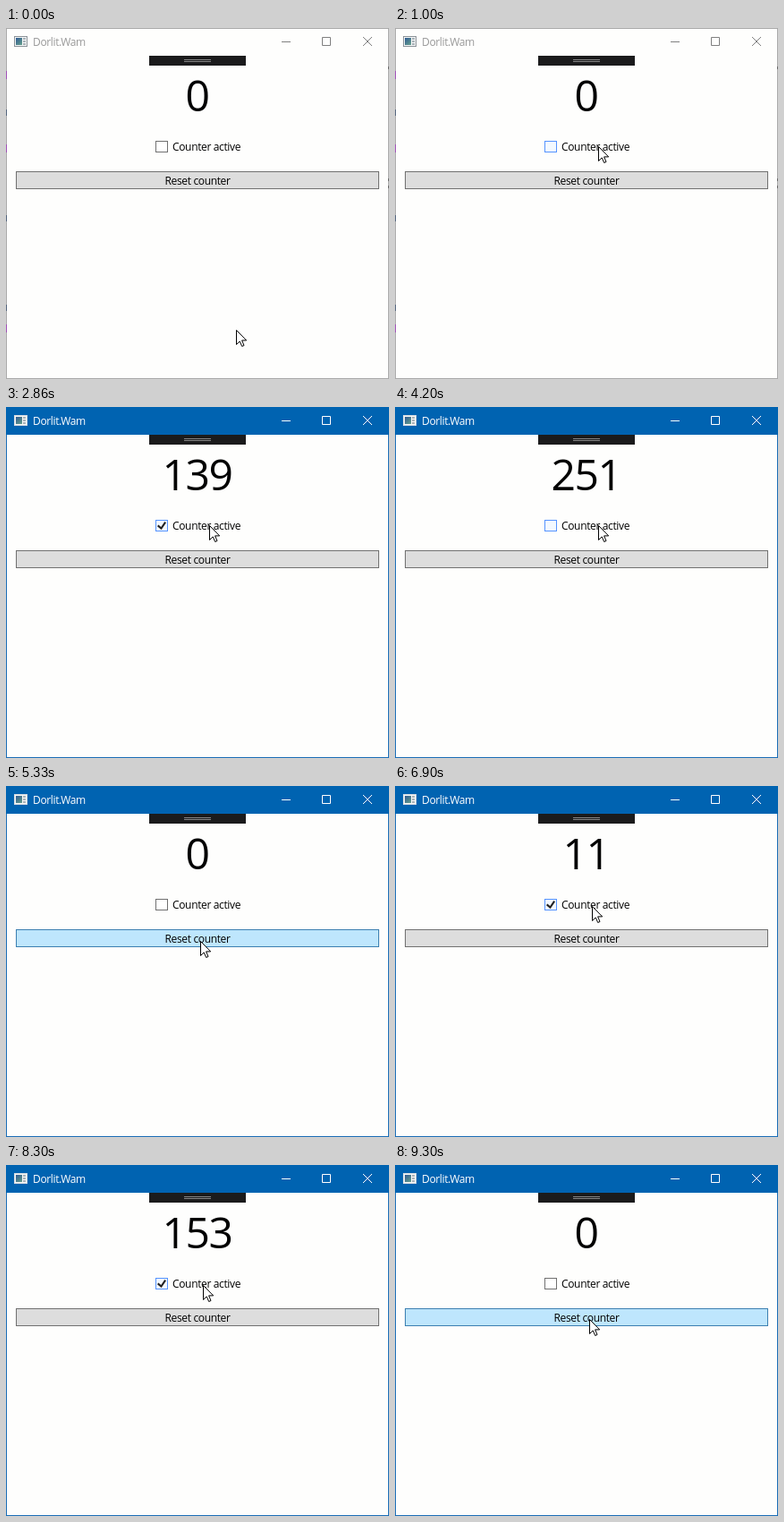
An HTML page with a canvas for the animation above (9.66 s loop, 428 px wide and 392 px high).

```html
<!DOCTYPE html>
<html lang="en">
<head>
<meta charset="utf-8">
<title>Counter window</title>
<style>
  html, body { margin: 0; width: 428px; height: 392px; overflow: hidden; }
  canvas { display: block; }
</style>
</head>
<body>
<canvas id="stage" width="428" height="392"></canvas>
<script>
const ctx = document.getElementById('stage').getContext('2d');
const LOOP = 9660;
const RATE = 0.1014; // counts per ms

// Pointer moves: start time, end time, end x, end y
const START = [257, 337];
const MOVES = [
  [230, 1000, 227, 132],
  [4170, 4900, 217, 173],
  [6130, 6640, 220, 134],
  [8470, 8880, 217, 172],
];
const ARROW = new Path2D('M.5 .5V16.5L4.2 12.9L6.7 18.5L9 17.5L6.6 11.9H11.7Z');
const TICK = new Path2D('M10 1.2L4.7 9.1H4.5L0 5.2L1.3 3.5L4.25 6.1L8.3 0Z');

const within = (t, a, b) => t >= a && t < b;
const ease = k => k * k * (3 - 2 * k);

function pointer(t) {
  let [x, y] = START;
  for (const [from, to, ex, ey] of MOVES) {
    const k = ease(Math.min(1, Math.max(0, (t - from) / (to - from))));
    x += (ex - x) * k;
    y += (ey - y) * k;
  }
  return [Math.round(x), Math.round(y)];
}

function count(t) {
  const run = (start, max) => Math.min(max, Math.floor((t - start) * RATE));
  if (within(t, 1500, 1660)) return 1;
  if (within(t, 1660, 5330)) return run(1487, 251);
  if (within(t, 6800, 9260)) return run(6788, 166);
  return 0;
}

function rect(x, y, w, h, fill) {
  ctx.fillStyle = fill;
  ctx.fillRect(x, y, w, h);
}

function box(x, y, w, h, fill, border) {
  rect(x, y, w, h, border);
  rect(x + 1, y + 1, w - 2, h - 2, fill);
}

function text(str, x, y, size, color, align, spacing) {
  ctx.font = `${size}px "Open Sans", "Noto Sans", sans-serif`;
  ctx.letterSpacing = spacing + 'px';
  ctx.textAlign = align;
  ctx.fillStyle = color;
  ctx.fillText(str, x, y);
}

function drawWindow(active) {
  box(0, 0, 428, 392, '#fefefd', active ? '#1a6db5' : '#a9a9a9');
  if (active) {
    rect(0, 0, 428, 31, '#0063b1');
  } else {
    // Background showing through the translucent border
    for (const y of [48, 130, 331]) rect(0, y, 1, 9, '#a050b8');
    for (const y of [91, 209, 309]) rect(0, y, 1, 7, '#52647c');
    for (const y of [43, 168, 176]) rect(427, y, 1, 3, '#666');
  }

  box(9, 9, 15, 12, '#f4f6f6', active ? '#d5dbe0' : '#8b9298');
  const pane = ctx.createLinearGradient(11, 11, 18, 19);
  pane.addColorStop(0, '#315b94');
  pane.addColorStop(1, '#65a08c');
  rect(11, 11, 7, 8, pane);
  for (const y of [11, 14, 17]) rect(19, y, 3, 2, '#a9b2b8');

  text('Dorlit.Wam', 30, 20, 12, active ? '#fff' : '#999', 'left', -0.35);

  ctx.strokeStyle = active ? '#fff' : '#808080';
  ctx.lineWidth = 1;
  ctx.beginPath();
  ctx.moveTo(308, 15.5);
  ctx.lineTo(318, 15.5);
  ctx.rect(353.5, 10.5, 9, 9);
  ctx.moveTo(399, 10);
  ctx.lineTo(409, 20);
  ctx.moveTo(409, 10);
  ctx.lineTo(399, 20);
  ctx.stroke();

  rect(160, 31, 108, 11, '#1b1b1c');
  rect(199, 35, 30, 1, '#858585');
  rect(199, 37, 30, 1, '#858585');
}

function drawCheckbox(hover, pressed, checked) {
  const [fill, border] = pressed ? ['#d9ecff', '#3c77dd']
    : hover ? ['#f3f9ff', '#5593ff'] : ['#fff', '#707070'];
  box(167, 126, 14, 13, fill, border);
  if (checked) {
    ctx.save();
    ctx.translate(169, 128);
    ctx.fillStyle = '#212121';
    ctx.fill(TICK);
    ctx.restore();
  }
  text('Counter active', 186, 137, 12, '#000', 'left', -0.35);
}

function drawButton(hover, pressed) {
  const [fill, border] = pressed ? ['#c4e5f6', '#2c628b']
    : hover ? ['#bee6fd', '#3c7fb1'] : ['#ddd', '#707070'];
  box(11, 160, 406, 20, fill, border);
  text('Reset counter', 214, 175, 12, '#000', 'center', -0.35);
}

function drawPointer([x, y]) {
  ctx.save();
  ctx.translate(x, y);
  ctx.fillStyle = '#fff';
  ctx.strokeStyle = '#000';
  ctx.fill(ARROW);
  ctx.stroke(ARROW);
  ctx.restore();
}

function draw(t) {
  const hoverY = pointer(t - 40)[1]; // hover trails the pointer slightly
  const checked = within(t, 1500, 4000) || within(t, 6800, 8430);
  const checkPressed = within(t, 1400, 1500) || within(t, 3900, 4000) || within(t, 8330, 8430);
  const resetPressed = within(t, 5200, 5330) || within(t, 9160, 9300);

  drawWindow(t >= 1300);
  text(count(t), 213.5, 93, 48, '#000', 'center', -1.5);
  drawCheckbox(within(hoverY, 126, 140), checkPressed, checked);
  drawButton(within(hoverY, 160, 180), resetPressed);
  drawPointer(pointer(t));
}

// Time advances in ticks of 30, 30 and 40 ms
function tick(ms) {
  const rest = ms % 100;
  return ms - rest + (rest < 30 ? 0 : rest < 60 ? 30 : 60);
}

function frame() {
  draw(tick(performance.now() % LOOP));
  requestAnimationFrame(frame);
}
frame();
</script>
</body>
</html>
```
